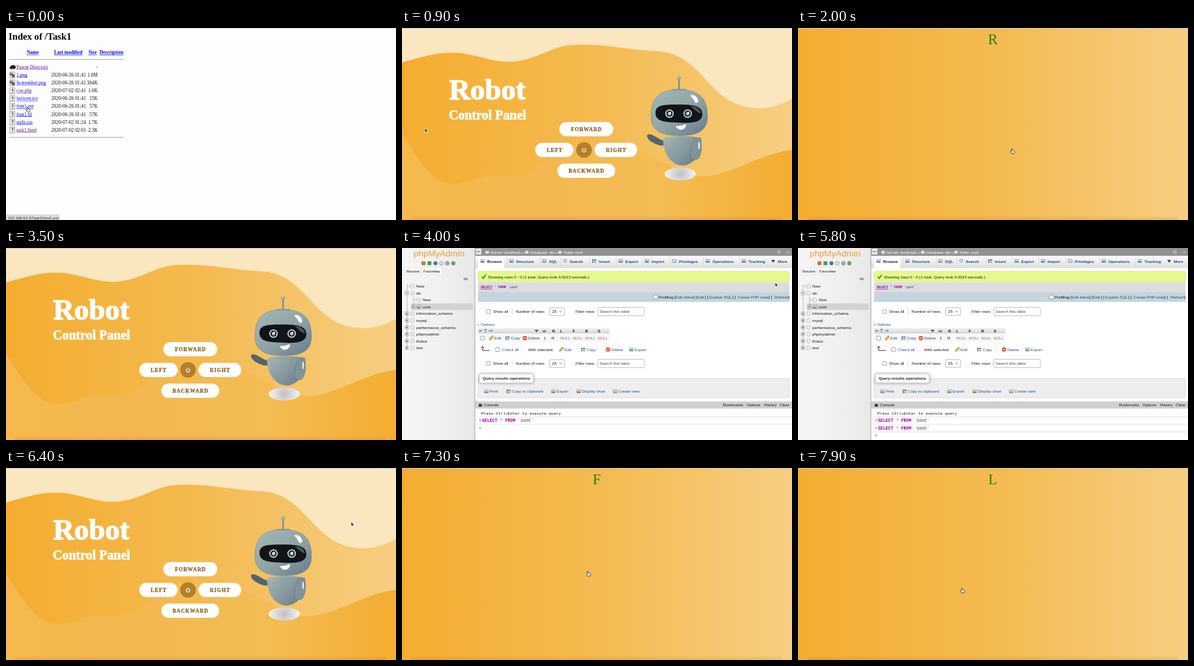
An HTML page with a canvas that plays this animation: 600x296 px, repeating every 8 s.

```html
<!DOCTYPE html>
<html lang="en">
<head>
<meta charset="utf-8">
<title>Robot control panel</title>
<style>
html, body { margin: 0; width: 100%; height: 100%; overflow: hidden; background: #fff; }
canvas { display: block; }
</style>
</head>
<body>
<canvas id="stage" width="600" height="296"></canvas>
<script>
const c = document.getElementById('stage').getContext('2d');
const LOOP = 8000;
const SERIF = '"Liberation Serif", serif', SANS = '"Liberation Sans", sans-serif', MONO = '"Liberation Mono", monospace';
const LINK = '#1c527c', INK = '#151515';

// ---- helpers ----
function text(str, x, y, size, color, family = SANS, style = '', align = 'left') {
  c.font = `${style} ${size}px ${family}`;
  c.textAlign = align;
  c.fillStyle = color;
  c.fillText(str, x, y);
  return c.measureText(str).width;
}
// Heavy display lettering
function heavy(str, x, y, size, color, align, weight) {
  text(str, x, y, size, color, SERIF, 'bold', align);
  c.strokeStyle = color;
  c.lineWidth = weight;
  c.strokeText(str, x, y);
  c.lineWidth = 0.6;
}
// Interface label, placed by the middle of its capitals
const label = (str, x, mid, color = INK, style = '') => text(str, x, mid + 2.2, 6.2, color, SANS, style);

function rect(x, y, w, h, fill, stroke, r = 0) {
  c.beginPath();
  c.roundRect(x, y, w, h, r);
  paint(fill, stroke);
}
function oval(x, y, rx, ry, fill, stroke) {
  c.beginPath();
  c.ellipse(x, y, rx, ry, 0, 0, 7);
  paint(fill, stroke);
}
function shape(d, fill, stroke) {
  const p = new Path2D(d);
  if (fill) { c.fillStyle = fill; c.fill(p); }
  if (stroke) { c.strokeStyle = stroke; c.stroke(p); }
}
function paint(fill, stroke) {
  if (fill) { c.fillStyle = fill; c.fill(); }
  if (stroke) { c.strokeStyle = stroke; c.stroke(); }
}
function blend(x0, y0, x1, y1, ...colors) {
  const g = c.createLinearGradient(x0, y0, x1, y1);
  colors.forEach((k, i) => g.addColorStop(i / (colors.length - 1), k));
  return g;
}
function statusBar(url, width) {
  rect(-3, 288, width + 3, 12, '#dcdcdc', '#bbb', 2);
  text('192.168.64.3/' + url, 3, 294.6, 6, '#333');
}

// ---- directory listing ----
const files = [
  ['Parent Directory', '', '-'],
  ['1.png', '2020-06-26 01:41', '1.0M'],
  ['Screenshot.png', '2020-06-26 01:41', '364K'],
  ['con.php', '2020-07-02 02:41', '1.6K'],
  ['favicon.ico', '2020-06-26 01:41', '15K'],
  ['font1.eot', '2020-06-26 01:41', '57K'],
  ['font1.ttf', '2020-06-26 01:41', '57K'],
  ['style.css', '2020-07-02 01:24', '1.7K'],
  ['task1.html', '2020-07-02 02:01', '2.3K']
];
const visited = ['Parent Directory', 'con.php', 'task1.html'];

function link(str, x, y, color, style) {
  const w = text(str, x, y, 7.4, color, SERIF, style);
  rect(x, y + 0.8, w, 0.6, color);
}
function fileIcon(i, y) {
  if (!i) {
    oval(11, y, 4, 3, '#222');
    shape(`M5 ${y + 1}l4-4v7z`, '#222');
    return;
  }
  rect(6, y - 4.5, 7.5, 9, '#fff', '#555');
  if (i < 3) {
    rect(6, y - 3, 5, 4, '#b5533c');
    oval(11, y + 1.5, 2.4, 2.4, '#4a5f86');
  } else text('?', 9.8, y + 3, 8.5, '#111', SERIF, 'bold', 'center');
}
function listing(cur) {
  rect(0, 0, 600, 296, '#fefdfe');
  rect(0, 0, 600, 1, '#ddd');
  text('Index of /Task1', 4, 18, 14.7, '#000', SERIF, 'bold');
  [['Name', 32], ['Last modified', 74], ['Size', 127], ['Description', 144]]
    .forEach(([s, x]) => link(s, x, 40.3, '#0000ee', 'bold'));
  for (const y of [48, 168]) rect(5, y, 176, 1, '#aaa');
  files.forEach(([name, date, size], i) => {
    const y = 62.6 + 12.15 * i;
    fileIcon(i, y - 2.4);
    link(name, 16, y, visited.includes(name) ? '#551a8b' : '#0000ee');
    text(date, 123, y, 7.4, '#111', SERIF, '', 'right');
    text(size, 141, y, 7.4, '#111', SERIF, '', 'right');
  });
  const row = Math.floor((cur.y - 57.5) / 12.15);
  if (files[row]) statusBar('Task1/' + files[row][0], 82);
}

// ---- control panel ----
const warm = () => blend(0, 0, 600, 0, '#f4ad2f', '#f4ba50', '#f6ce82');
const buttons = [['FORWARD', 242, 145, 83], ['LEFT', 205, 177, 59], ['RIGHT', 296, 177, 66], ['BACKWARD', 239, 209, 89]];

function edges() {
  rect(0, 0, 600, 1, '#d8d0c0');
  rect(14, 289, 570, 7, blend(0, 289, 0, 296, 'rgba(165,115,30,0)', 'rgba(165,115,30,.2)'));
}
function robot() {
  const metal = blend(390, 95, 455, 178, '#a3b6b4', '#90a4a6', '#66798a');
  const shadow = c.createRadialGradient(428, 225, 1, 428, 225, 24);
  shadow.addColorStop(0, '#c4c2c4');
  shadow.addColorStop(1, '#f6f4f3');
  oval(428, 225, 24, 10, shadow);
  rect(425, 79, 2.4, 17, '#788e8f');
  oval(426, 77, 3, 3, '#8da2a3');
  oval(425.3, 76, 1, 1, '#fff');
  rect(415, 94, 23, 8, '#7f9495', null, 3);
  shape('M404 174C394 172 387 163 379 164C374 165 379 173 385 176C391 180 398 182 404 181Z', '#53646f');
  shape('M402 169Q431 164 460 169C464 187 452 212 431 212C412 211 400 190 402 169Z', blend(405, 168, 455, 212, '#a3b4b3', '#8799a0', '#687b88'));
  shape('M451 171C463 169 463 188 457 200C453 206 443 203 444 194C445 186 446 176 451 171Z', '#7f949a', '#647a82');
  oval(457, 181, 1.3, 6, '#e9efed');
  shape('M383 136C383 106 397 95 426 95S470 106 470 136C470 158 456 166 427 166S383 158 383 136Z', metal, '#748a8c');
  shape('M390 131C390 118 403 118 427 118S462 121 462 133S448 147 427 146S390 145 390 131Z', '#111418');
  shape('M444 120Q458 121 460 132Q453 130 444 120Z', '#4b5258');
  for (const x of [411.5, 439.5]) {
    oval(x, 132, 6.5, 6.5, '#e8eeee');
    oval(x, 132, 5, 5, '#1d2a34');
    oval(x, 132, 2.6, 2.6, '#b7c9cc');
    oval(x + 1, 130.5, 1.3, 1.3, '#fff');
  }
  shape('M421 151Q429 152 437 148Q437 156 429 157Q423 156 421 151Z', '#fff');
  shape('M443 104Q452 101 456 112Q455 117 451 115Q448 108 443 104Z', '#f7faf9');
}
function panel() {
  rect(0, 0, 600, 296, '#fae7bf');
  shape('M0 53C28 46 48 38 77 38C112 38 133 53 168 52C208 50 229 27 265 26C312 24 349 34 395 36C441 39 459 75 489 101C518 127 562 132 600 109V296H0Z', warm());
  shape('M0 163C19 192 45 241 78 241C111 240 120 224 151 228C181 231 200 223 226 202C255 178 299 170 337 178C378 188 405 213 441 226C491 240 537 196 600 188V296H0Z',
    blend(0, 0, 600, 0, '#f6b94e', '#f4b750', '#f4bc54', '#f3ad31'));
  heavy('Robot', 72.5, 110, 45, '#fff', 'left', 1.3);
  heavy('Control Panel', 72, 141, 20, '#fff', 'left', 0.7);
  c.letterSpacing = '1px';
  for (const [s, x, y, w] of buttons) {
    rect(x, y, w, 22, '#fff', null, 11);
    heavy(s, x + w / 2 + 0.5, y + 13.7, 8, '#8f641d', 'center', 0.3);
  }
  c.letterSpacing = '0px';
  oval(280, 188, 12, 12, '#b47f28');
  c.lineWidth = 1.1;
  c.beginPath();
  c.arc(280, 188.4, 2.8, -0.9, 4.04);
  paint(null, '#fff');
  shape('M280 184.6v3.4', null, '#fff');
  c.lineWidth = 0.6;
  robot();
  edges();
}
function reply(letter) {
  rect(0, 0, 600, 296, warm());
  text(letter, 299.7, 25.4, 22.5, '#21801c', SERIF, '', 'center');
  edges();
}

// ---- database page ----
function dot(x, y, kind) {
  if (kind === 'edit') shape(`M${x - 3} ${y + 3}l1-3 4-4 2 2-4 4z`, '#eeb142', '#9a7434');
  else if (kind === 'delete') {
    oval(x, y, 3.3, 3.3, '#e0442c');
    rect(x - 2, y - 0.6, 4, 1.2, '#fff');
  } else if (kind === 'copy') {
    rect(x - 3, y - 3, 1.2, 6, '#2f5c96');
    rect(x - 1, y - 2.5, 4, 2, '#4d78b0');
    rect(x - 1, y + 0.7, 4, 2, '#caa25a');
  } else {
    rect(x - 3, y - 2.5, 6, 5, '#d9e2ea', '#6d88a5');
    rect(x - 3, y, 5, 2, kind || '#5a83ae');
  }
}
const action = (kind, str, x, y) => { dot(x - 5, y, kind); label(str, x, y, LINK); };
const box = (x, y) => rect(x - 3, y - 3, 6, 6, '#fff', '#666', 1);

function sidebar() {
  rect(0, 0, 111, 296, blend(0, 0, 111, 0, '#f5f5f5', '#f1f1f1', '#e8e8e8'));
  rect(111, 0, 2, 296, '#c8c8c8');
  text('phpMyAdmin', 18, 13, 13.4, '#f29a2e');
  ['#b97a45', '#4c9b55', '#4477b5', '#d5dde5', '#a4a4a4', '#63a757'].forEach((k, i) => {
    const x = 33 + i * 9.2;
    if (i > 1) oval(x, 23.5, 3, 3, k, '#888'); else rect(x - 3, 20.5, 6, 6, k, null, 1);
  });
  [['Recent', 4, 25], ['Favorites', 30, 32]].forEach(([s, x, w]) => {
    rect(x, 30, w, 11, '#f8f8f8', '#ddd', 1);
    label(s, x + 3, 36);
  });
  rect(95, 46.5, 6, 2.5, '#aaa', '#777', 1);
  rect(14, 85.5, 95, 10, '#d2d2d2');
  shape('M8 56V154M8 59h6M18 75V91M18 80h7', null, '#999');
  ['New', 'db', 'New', 'cont', 'information_schema', 'mysql', 'performance_schema', 'phpmyadmin', 'Robot', 'test'].forEach((s, i) => {
    const y = 59 + i * 10.55, inner = i === 2 || i === 3, x = inner ? 32 : 22;
    if (i && i !== 2) {
      const bx = inner ? 15 : 5;
      rect(bx, y - 2.5, 5, 5, '#fff', '#777');
      rect(bx + 1, y - 0.3, 3, 0.7, '#222');
      if (i !== 1) rect(bx + 2.2, y - 1.5, 0.7, 3, '#222');
    }
    if (i === 3) dot(x - 6, y); else rect(x - 8.5, y - 2.8, 5, 5.6, '#f2f4f6', '#999', 1.5);
    label(s, x, y);
  });
}
function showRow(y) {
  box(133, y);
  label('Show all', 140, y);
  rect(169, y - 5, 0.7, 10, '#ccc');
  label('Number of rows:', 175, y);
  rect(227, y - 6, 23, 12, '#fff', '#888', 2);
  label('25', 231, y);
  shape(`M242 ${y - 1}l2 2 2-2`, null, '#333');
  label('Filter rows:', 267, y);
  rect(301, y - 6.5, 72, 13, '#fff', '#999', 2);
  label('Search this table', 304, y, '#444');
}
function query(x, y, size) {
  const step = size * 0.6;
  text('SELECT', x, y, size, '#990099', MONO, 'bold');
  text('*', x + step * 7, y, size, '#c0c', MONO);
  text('FROM', x + step * 9, y, size, '#990099', MONO, 'bold');
  text('`cont`', x + step * 14, y, size, '#222', MONO);
}
function database(t, hovering) {
  const fresh = t >= 4500, loading = fresh && t < 4750;
  rect(0, 0, 600, 296, '#fff');
  rect(113, 0, 487, 12, '#919191');
  dot(131, 6.5, '#ddd');
  dot(192, 6.5, '#ddd');
  dot(243, 6.5, '#ddd');
  [['Server: localhost', 136], ['»', 184], ['Database: db', 197], ['»', 235], ['Table: cont', 248]]
    .forEach(([s, x]) => label(s, x, 6.5, '#fff'));
  rect(114, 1, 8, 9, '#eee');
  shape('M121 5.5h-5m2-2l-2 2 2 2', null, '#444');
  oval(580, 6, 2.2, 2.2, null, '#fff');
  shape('M592 8l2.5-3 2.5 3', null, '#fff');

  rect(113, 12, 487, 19, blend(0, 12, 0, 31, '#fbfbfb', '#dedede'));
  rect(117, 12, 40, 19, '#fff');
  [['Browse', 131], ['Structure', 175.5], ['SQL', 226], ['Search', 258], ['Insert', 303], ['Export', 343.5], ['Import', 384],
    ['Privileges', 426], ['Operations', 477.5], ['Tracking', 533], ['More', 578]].forEach(([s, x], i) => {
    if (i === 10) shape('M568 18.5h6l-3 4z', '#333');
    else if (i === 3) oval(x - 7, 19.5, 2.4, 2.4, '#dbe7ef', '#666');
    else dot(x - 7, 20, ['#5a83ae', '#5a83ae', '#999', '', 'copy', '#58a058', '#5a83ae', '#c9c9c9', '#777', '#679'][i]);
    label(s, x, 20.5, i ? LINK : '#222', 'bold');
    if (i && i < 10) rect(x - 14, 13, 0.7, 17, '#d2d2d2');
  });

  rect(117, 36, 479, 16, '#e5fb89', '#c3d67a', 2);
  c.lineWidth = 1.4;
  shape('M123 44l2 3 4-6', null, '#3c7d1c');
  c.lineWidth = 0.6;
  label('Showing rows 0 - 0 (1 total, Query took 0.0013 seconds.)', 132, 44.5);
  rect(117, 53, 479, 30, '#dadcde');
  rect(117, 68, 479, 15, '#c6d4dd');
  query(121, 62, 5);
  rect(121, 63, 18, 0.6, '#990099');
  box(390, 75.5);
  label('Profiling [', 395, 75.5);
  [['Edit inline', 421], ['] [', 448], ['Edit', 454], ['] [', 466], ['Explain SQL', 473], ['] [', 508],
    ['Create PHP code', 516], ['] [', 564], ['Refresh', 573], [']', 594.5]].forEach(([s, x], i) => label(s, x, 75.5, i % 2 ? INK : LINK));
  if (hovering) rect(573, 78.5, 21, 0.6, LINK);

  showRow(98);
  label('+ Options', 116, 118, LINK);
  const shift = loading ? -4 : 0;
  rect(117, 123, 202 + shift, 9, blend(0, 123, 0, 132, '#f4f4f4', '#d4d4d4'));
  if (!loading) {
    c.lineWidth = 0.9;
    shape('M124 127.5h-5m2-2l-2 2 2 2M126 125.5h5m-2.5 0v5M133 127.5h6m-2-2l2 2-2 2', null, '#4c78a0');
    c.lineWidth = 0.6;
    shape('M204 126h6l-3 4z', '#555');
  }
  label('id', 216 + shift / 4, 128, LINK, 'bold');
  label('R', 231 + shift / 4, 128, '#222', 'bold');
  rect(117, 133, 202 + shift, 12, '#f7f7f7');
  [...'LFBS'].forEach((s, i) => {
    const x = 243.3 + shift + i * 19.2;
    label(s, x, 128, '#222', 'bold');
    label('NULL', x, 139, '#777', 'italic');
  });
  box(124, 139);
  action('edit', 'Edit', 142, 139);
  action('copy', 'Copy', 167.5, 139);
  action('delete', 'Delete', 194, 139);
  label('1', 218, 139);
  label('R', 230, 139);

  c.lineWidth = 1;
  shape('M124 152v6h11M121.5 154.5l2.5-3 2.5 3', null, '#333');
  c.lineWidth = 0.6;
  box(147, 156.5);
  label('Check all', 154, 156.5, LINK);
  label('With selected:', 194, 156.5, INK, 'italic');
  action('edit', 'Edit', 250, 156.5);
  action('copy', 'Copy', 284, 156.5);
  action('delete', 'Delete', 322, 156.5);
  action('#58a058', 'Export', 358, 156.5);
  showRow(178);

  rect(117, 201, 479, 30, '#eee', '#ccc', 2);
  c.shadowColor = 'rgba(0,0,0,.35)';
  c.shadowBlur = 4;
  rect(119, 194, 83, 14, '#fff', '#ccc', 2);
  c.shadowBlur = 0;
  label('Query results operations', 124, 201, '#222', 'bold');
  action('#888', 'Print', 135, 221);
  action('copy', 'Copy to clipboard', 169, 221);
  action('#58a058', 'Export', 238, 221);
  if (loading) label('Display chart', 277, 221, LINK);
  else action('#c5604c', 'Display chart', 277, 221);
  action('#c5a24c', 'Create view', 333, 221);

  rect(113, 236, 487, 60, '#fff');
  rect(113, 236.5, 487, 11, '#cfcfcf');
  rect(118, 240.5, 5, 4, '#333');
  label('Console', 126, 242);
  [['Bookmarks', 494], ['Options', 530], ['History', 557], ['Clear', 581]].forEach(([s, x]) => label(s, x, 242));
  text('Press Ctrl+Enter to execute query', 122, 256.5, 6.2, '#111', MONO);
  const lines = fresh ? 2 : 1;
  for (let i = 0; i <= lines; i++) {
    const y = 268 + i * 11.5;
    rect(115, y - 8, 485, 0.7, '#ddd');
    if (i < lines || !loading) text('>', 118, y, 6.6, '#444', MONO);
    if (i < lines) query(123, y, 6.6);
  }
  sidebar();
  if (hovering) statusBar('phpmyadmin/sql.php', 199);
}

// ---- pointer ----
const route = [
  [0, 34, 126], [450, 34, 158], [850, 34, 158], [1700, 330, 190], [2900, 330, 190], [3300, 620, -12], [3599, 620, -12],
  [3600, 560, 26], [4350, 589, 82], [4950, 589, 82], [5350, 591, 28], [5500, 620, -12], [6200, 620, 60],
  [6800, 287, 163], [7500, 287, 163], [7750, 253, 189], [LOOP, 253, 189]
];
function pointerAt(t) {
  const i = route.findIndex(k => k[0] > t);
  const [t0, x0, y0] = route[i - 1], [t1, x1, y1] = route[i];
  const p = (t - t0) / (t1 - t0), e = p * p * (3 - 2 * p);
  return { x: x0 + (x1 - x0) * e, y: y0 + (y1 - y0) * e };
}
function pointer({ x, y }, hand) {
  c.save();
  c.translate(x, y);
  c.lineWidth = 0.8;
  if (hand) shape('M-1.8-3.6Q-.8-4.4-.3-3.2L.2-1.2L2.4-.6Q3.6 0 3.2 1.4L2.4 3.6H-1.2L-3.2.8Q-3.2-.4-1.4.4Z', '#fff', '#222');
  else shape('M-2-4V3L-.4 1.5.8 4 2 3.4.8 1H3Z', '#222', '#fff');
  c.restore();
}

// ---- timeline: start time and view ----
const scenes = [[0, 'list'], [600, 'panel'], [1900, 'R'], [2850, 'panel'], [3600, 'data'], [6000, 'panel'], [6900, 'F'], [7500, 'panel'], [7800, 'L']];

function draw(now) {
  const t = now % LOOP;
  const view = scenes.filter(s => s[0] <= t).pop()[1];
  const cur = pointerAt(t);
  let hand = true;
  c.lineWidth = 0.6;
  if (view === 'list') listing(cur);
  else if (view === 'panel') {
    panel();
    hand = buttons.some(([, x, y, w]) => cur.x > x && cur.x < x + w && cur.y > y && cur.y < y + 22);
  } else if (view === 'data') {
    hand = cur.x > 572 && cur.y > 74;
    database(t, hand);
  } else reply(view);
  pointer(cur, hand);
}
const start = performance.now();
function tick() {
  draw(performance.now() - start);
  requestAnimationFrame(tick);
}
tick();
</script>
</body>
</html>
```
